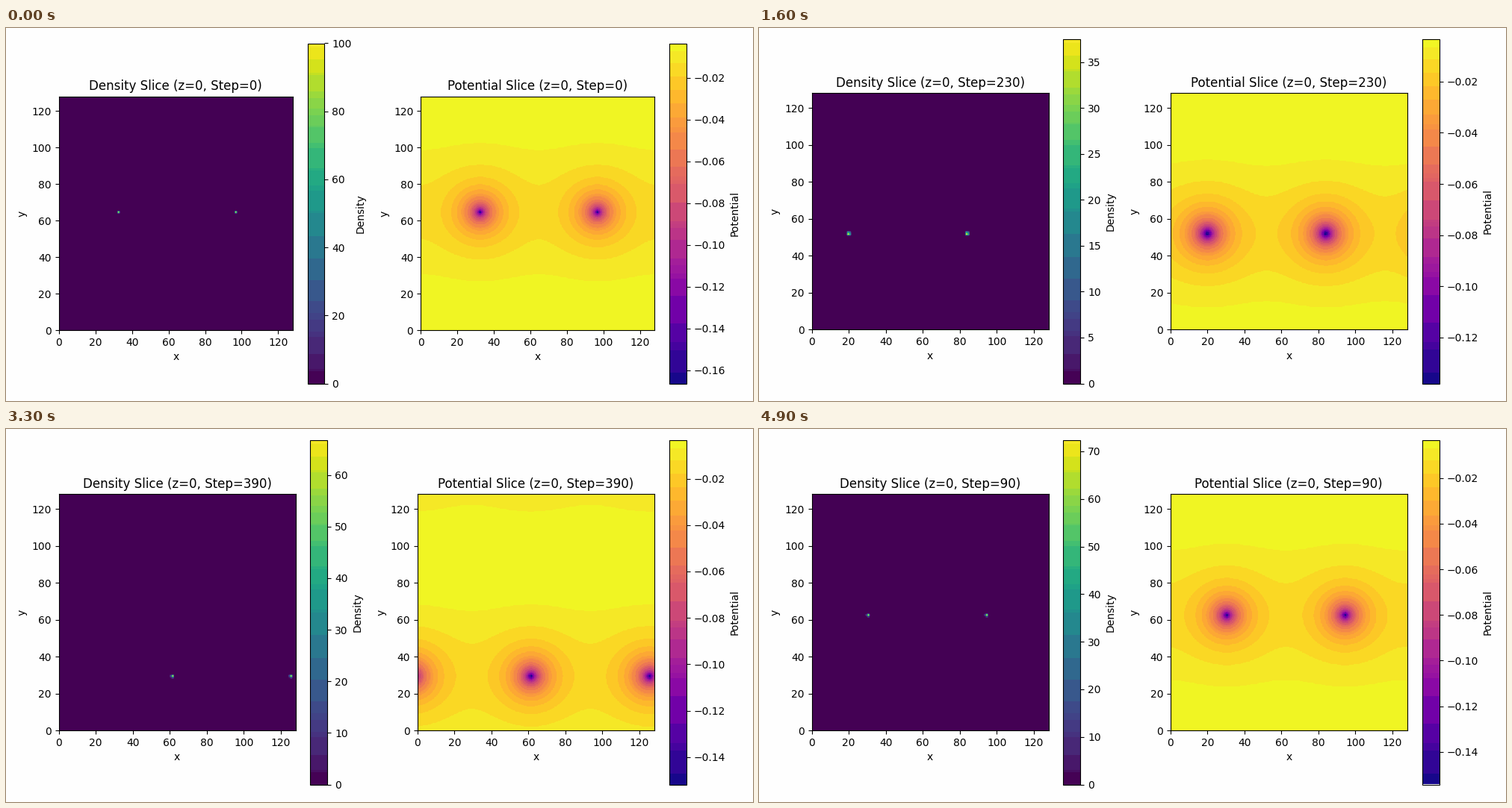
A matplotlib script that plays this animation: 1000 px wide and 500 px high, repeating every 5 s.

```python
import matplotlib.pyplot as plt
import numpy as np
from matplotlib.animation import FuncAnimation
from matplotlib.colors import ListedColormap

N = 128
STEPS = sorted(range(0, 500, 10), key=str)  # alphabetical order of the steps
PHI_MIN, PHI_MAX = -0.1663, -0.0034         # potential range at step 0
POINT, MU = 0.025, 0.2816                   # point share, inverse core radius
MARGINS = dict(left=0.125, right=0.9, bottom=0.11, top=0.88,
               wspace=0.2, hspace=0.2)
NAMES = ("viridis", "plasma")
LUT = np.vstack([plt.get_cmap(n)(np.arange(256), bytes=True)[:, :3]
                 for n in NAMES]).astype(int)
CUBE = LUT[:, 0] // 32 * 128 + LUT[:, 1] // 16 * 8 + LUT[:, 2] // 32


def green():
    """In-plane Fourier kernel of a 3D potential with a softened core."""
    c = 2 - 2 * np.cos(2 * np.pi * np.fft.fftfreq(N))
    q = c[:, None] + c
    q[0, 0] = 1
    core = q + MU**2
    out = 1 / np.sqrt(q * (q + 4)) - (1 - POINT) / np.sqrt(core * (core + 4))
    out[0, 0] = 0
    return out


def spread(c):
    """Share the mass at c between its two nearest cells."""
    d = (np.arange(N) - c + N / 2) % N - N / 2
    return np.clip(1 - np.abs(d), 0, 1)


def density(step):
    s = 2.211e-4 * step**2 + 0.003984 * step
    return 100 * np.outer(spread(64 - s), spread(32 - s) + spread(96 - s))


GREEN = green()


def raw_potential(rho):
    return -np.fft.ifft2(np.fft.fft2(rho) * GREEN).real


base = raw_potential(density(0))
GAIN = (PHI_MAX - PHI_MIN) / np.ptp(base)


def potential(rho):
    return PHI_MIN + (raw_potential(rho) - base.min()) * GAIN


def banded(fields):
    """Merge neighbouring map colours into flat bands, weighted by area."""
    weight = np.concatenate(
        [6 * np.histogram(f, 256)[0] + 41 for f in fields])
    total = np.maximum(np.bincount(CUBE, weight, 1024), 1)
    mean = np.stack([np.bincount(CUBE, weight * LUT[:, c], 1024) / total
                     for c in range(3)], axis=1)
    colors = np.clip((mean[CUBE] + 0.5) / 255, 0, 1)
    return ListedColormap(colors[:256]), ListedColormap(colors[256:])


fig, axes = plt.subplots(1, 2, figsize=(10, 5), dpi=100, facecolor="#fefefe")
images = []
for ax, name, label in zip(axes, NAMES, ("Density", "Potential")):
    im = ax.imshow(base, origin="lower", extent=(0, N, 0, N), cmap=name)
    ax.set(xlabel="x", ylabel="y")
    fig.colorbar(im, ax=ax, label=label)
    images.append(im)


def draw(i):
    step = STEPS[i]
    rho = density(step)
    fields = rho, potential(rho)
    for ax, im, f, cmap, kind in zip(axes, images, fields, banded(fields),
                                     ("Density", "Potential")):
        im.set_data(f)
        im.set_cmap(cmap)
        im.set_clim(f.min(), f.max())
        ax.set_title(f"{kind} Slice (z=0, Step={step})")
    fig.subplots_adjust(**MARGINS)
    fig.tight_layout()
    return images


anim = FuncAnimation(fig, draw, frames=len(STEPS), interval=100,
                     repeat=True, repeat_delay=0, blit=False)
plt.show()
```
